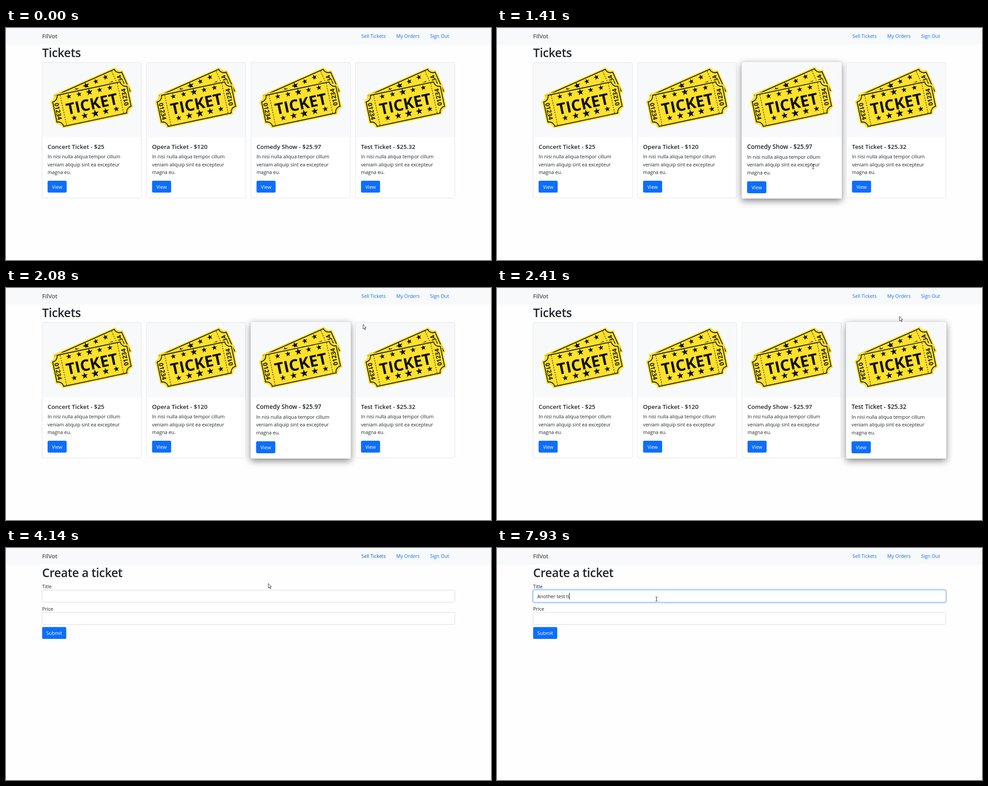
Recreate the animation shown at these times as an HTML page. Size 1081 by 518 pixels, loop 8000 ms.

```html
<!DOCTYPE html>
<html lang="en">
<head>
<meta charset="utf-8">
<title>Ticket shop</title>
<style>
  html, body { margin: 0; width: 100%; height: 100%; overflow: hidden; background: #fefefe; }
  svg { display: block; width: 100vw; height: 100vh; }
  text { font: 10.68px 'Open Sans', 'Noto Sans', sans-serif; fill: #212529; white-space: pre; }
  .h1 { font-size: 26.4px; font-weight: 600; letter-spacing: -.3px; }
  .h5 { font-size: 13.4px; font-weight: 600; }
  .brand { font-size: 13.35px; }
  .link { fill: #0d6efd; }
  .label { fill: #fff; text-anchor: middle; }
  .big { font-size: 35px; font-weight: 700; fill: #111; text-anchor: middle; }
  .digits { font-size: 13.5px; font-weight: 700; fill: #111; text-anchor: middle; }
</style>
</head>
<body>
<svg id="stage" viewBox="0 0 1081 518"></svg>
<script>
const LOOP = 8000;
const CARD = { x: 80.5, y: 77, w: 221.2, h: 302.5, pitch: 232.85 };
const $ = id => document.getElementById(id);

// ---- markup helpers ----
const text = (x, y, str, cls = '', attrs = '') =>
  `<text x="${x}" y="${y}" class="${cls}" ${attrs}>${str}</text>`;
const box = (x, y, w, h, attrs) =>
  `<rect x="${x}" y="${y}" width="${w}" height="${h}" ${attrs}/>`;
const button = (x, y, w, label) =>
  box(x, y, w, 26.5, 'rx="3" fill="#0d6efd"') + text(x + w / 2, y + 18, label, 'label');

function star(x, y, r) {
  const points = Array.from({ length: 10 }, (_, i) => {
    const a = i * Math.PI / 5 - Math.PI / 2, d = i % 2 ? r * .4 : r;
    return (x + d * Math.cos(a)).toFixed(1) + ',' + (y + d * Math.sin(a)).toFixed(1);
  });
  return `<polygon points="${points.join(' ')}" fill="#111"/>`;
}

// Rectangle around the origin with concave corners
const stub = (w, h, r) => `M${r - w},${-h}H${w - r}A${r},${r} 0 0 0 ${w},${r - h}V${h - r}` +
  `A${r},${r} 0 0 0 ${w - r},${h}H${r - w}A${r},${r} 0 0 0 ${-w},${h - r}V${r - h}A${r},${r} 0 0 0 ${r - w},${-h}Z`;

function ticket() {
  const stars = [-2, -1, 0, 1, 2].map(i =>
    star(i * 23.4, -27.5, i ? 6.3 : 8) + star(3 + i * 24, 22, 9 - Math.abs(i) * 1.2)).join('');
  return `<path d="${stub(88, 39, 12.5)}" fill="#fee12b"/>
    <path d="${stub(84.5, 35.5, 12.5)}" fill="none" stroke="#111" stroke-width="1.8"/>
    <path d="M-65,-34V34M65,-34V34" stroke="#111" stroke-width="1.1" stroke-dasharray="3 2.4"/>
    ${stars}${text(0, 12, 'TICKET', 'big')}
    ${text(0, 4.8, '01234', 'digits', 'transform="translate(-77,0) rotate(90)"')}
    ${text(0, 4.8, '01234', 'digits', 'transform="translate(75,0) rotate(-90)"')}`;
}

// Drawn relative to its own top left corner
function card(title, i) {
  const { w, h } = CARD;
  const body = ['In nisi nulla aliqua tempor cillum', 'veniam aliquip sint ea excepteur', 'magna eu.'];
  return `<g id="card${i}">
    ${box(0, 0, w, h, `id="shade${i}" rx="3" fill="#fff" filter="url(#shadow)"`)}
    ${box(0, 0, w, h, 'rx="3" fill="#fff"')}
    ${box(.5, .5, w - 1, 166, 'rx="2.5" fill="#f8f9fa"')}
    ${box(0, 0, w, h, 'rx="3" fill="none" stroke="#000" stroke-opacity=".125" stroke-width=".9"')}
    <use href="#pair"/>
    ${text(12.2, 192.6, title, 'h5')}
    ${body.map((line, n) => text(12.2, 214.4 + n * 17.1, line)).join('')}
    ${button(12.2, 264, 42.5, 'View')}</g>`;
}

const field = (y, id) => box(80.5, y, 919.8, 26.8, `id="${id}" rx="3" fill="#fff" stroke="#ced4da" stroke-width=".9"`);
const titles = ['Concert Ticket - $25', 'Opera Ticket - $120', 'Comedy Show - $25.97', 'Test Ticket - $25.32'];

$('stage').innerHTML = `
  <defs>
    <filter id="shadow" x="-20%" y="-20%" width="140%" height="140%">
      <feDropShadow dx="0" dy="5" stdDeviation="8" flood-color="#000" flood-opacity=".47"/>
    </filter>
    <g id="ticket">${ticket()}</g>
    <g id="pair">
      <use href="#ticket" transform="translate(109.5,77) rotate(-24)"/>
      <use href="#ticket" transform="translate(111,93) rotate(-12)"/>
    </g>
  </defs>
  ${box(0, 0, 1081, 518, 'fill="#fefefe"')}
  ${box(0, 0, 1081, 36.7, 'fill="#f8f9fa"')}
  ${text(80.5, 23, 'FilVot', 'brand')}
  <g id="sell">${text(792.3, 21.8, 'Sell Tickets', 'link', 'id="sellText"')}</g>
  ${text(869.8, 21.8, 'My Orders', 'link')}
  ${text(945.2, 21.8, 'Sign Out', 'link')}
  <g id="list">${text(80.5, 65, 'Tickets', 'h1')}${titles.map(card).join('')}</g>
  <g id="form">
    ${text(80.5, 65, 'Create a ticket', 'h1')}
    ${text(80.5, 89.8, 'Title')}
    ${box(79.1, 92.7, 922.6, 29.6, 'id="ring" rx="4.5" fill="none" stroke="#0d6efd" stroke-opacity=".25" stroke-width="2.8"')}
    ${field(94.1, 'titleField')}
    ${text(80.5, 139.6, 'Price')}
    ${field(143.8, 'priceField')}
    ${button(80.5, 176.4, 53.8, 'Submit')}
    ${text(89.8, 111.6, '', '', 'id="value"')}
    ${box(0, 100, 1, 15, 'id="caret" fill="#111"')}
  </g>
  <g id="pointer" stroke-linejoin="round">
    <path id="arrow" d="M0,0V10.2L2.3,8.1L3.9,11.7L5.5,11L3.9,7.5H7Z" fill="#fff" stroke="#222" stroke-width=".9"/>
    <path id="beam" d="M-2.3,-4.5H-.6L0,-4L.6,-4.5H2.3M0,-4V4M-2.3,4.5H-.6L0,4L.6,4.5H2.3" fill="none" stroke="#222"/>
    <path id="hand" d="M-1,6.8V.8Q0,-.6 1,.8V4.6L5,5.4Q6.2,5.8 6,7.4L5.2,10.4V12.4H-.6L-3.6,7.8Q-3.6,6.4 -2.2,6.8L-1,8Z"
      fill="#fff" stroke="#222" stroke-width=".9"/>
  </g>`;

// ---- timeline ----
const path = [ // time, x, y
  [470, 746, 514], [600, 880, 420], [740, 972, 346], [1140, 972, 346], [1320, 742, 318], [1410, 706.5, 310],
  [1560, 440, 280], [1740, 200, 215], [1940, 230, 150], [2010, 610, 100], [2080, 795.5, 81.5],
  [2330, 885, 80], [2540, 917, 37], [2750, 917, 37], [2880, 850, 25], [3010, 828, 20],
  [4070, 828, 20], [4110, 700, 50], [4140, 585.5, 79], [4360, 400, 123], [4540, 355.5, 114]
];
const typing = [ // time, letters kept from the phrase
  [6200, 1], [6390, 2], [6590, 3], [6790, 4], [6880, 5], [6960, 6], [7050, 7], [7190, 8],
  [7330, 9], [7430, 10], [7530, 11], [7630, 12], [7730, 13], [7830, 14], [7930, 15]
];
const PHRASE = 'Another test ti';

function pointerAt(t) {
  if (t < path[0][0]) return { x: -50, y: -50 };
  const n = path.findIndex(p => p[0] > t);
  if (n < 0) { const [, x, y] = path[path.length - 1]; return { x, y }; }
  const [t0, x0, y0] = path[n - 1], [t1, x1, y1] = path[n], k = (t - t0) / (t1 - t0);
  return { x: x0 + (x1 - x0) * k, y: y0 + (y1 - y0) * k };
}

const overSell = p => p.x > 787 && p.x < 853 && p.y > 8 && p.y < 28;
function cardUnder(p) {
  const i = Math.floor((p.x - CARD.x) / CARD.pitch);
  const inside = p.x - CARD.x - i * CARD.pitch < CARD.w && p.y > CARD.y && p.y < CARD.y + CARD.h;
  return inside ? i : -1;
}

function typedAt(t) {
  if (t >= 5680 && t < 6040) return 'a';
  const last = typing.filter(k => k[0] <= t).pop();
  return last ? PHRASE.slice(0, last[1]) : '';
}

const show = (id, on) => $(id).setAttribute('visibility', on ? 'inherit' : 'hidden');
const clamp = v => Math.max(0, Math.min(1, v));

function render(t) {
  const p = pointerAt(t), onList = t < 3610;
  show('list', onList);
  show('form', !onList);

  const hovered = cardUnder(pointerAt(t - 70));
  titles.forEach((_, i) => {
    const on = i === hovered, { x, y, w, h, pitch } = CARD;
    const zoom = on ? ` translate(${w / 2},${h / 2}) scale(1.01) translate(${-w / 2},${-h / 2})` : '';
    $('card' + i).setAttribute('transform', `translate(${x + i * pitch},${y})` + zoom);
    show('shade' + i, onList && on);
  });

  const grow = [0, 12, 24, 36, 48].filter(d => overSell(pointerAt(t - d))).length / 5;
  $('sell').setAttribute('transform', `translate(819.5,18) scale(${1 + .2 * grow}) translate(-819.5,-18)`);
  $('sellText').style.fill = grow > 0 || (t > 3010 && t < 4800) ? '#0a58ca' : '#0d6efd';

  const focus = clamp((t - 4740) / 150);
  $('ring').setAttribute('opacity', focus);
  $('titleField').setAttribute('stroke', focus > .5 ? '#86b7fe' : '#ced4da');
  $('value').textContent = typedAt(t);
  $('caret').setAttribute('x', 89.8 + (onList ? 0 : $('value').getComputedTextLength()));
  show('caret', !onList && t >= 4740 && !(t >= 5280 && t < 5680));

  const inset = (p.x - CARD.x) % CARD.pitch;
  const overText = onList
    ? cardUnder(p) >= 0 && inset > 12 && inset < 209 && p.y > 257 && p.y < 329
    : p.y > 94 && p.y < 121;
  const kind = overSell(p) ? 'hand' : overText ? 'beam' : 'arrow';
  ['arrow', 'beam', 'hand'].forEach(id => show(id, id === kind));
  $('pointer').setAttribute('transform', `translate(${p.x},${p.y})`);
}

function tick() {
  render(performance.now() % LOOP);
  requestAnimationFrame(tick);
}
tick();
</script>
</body>
</html>
```
